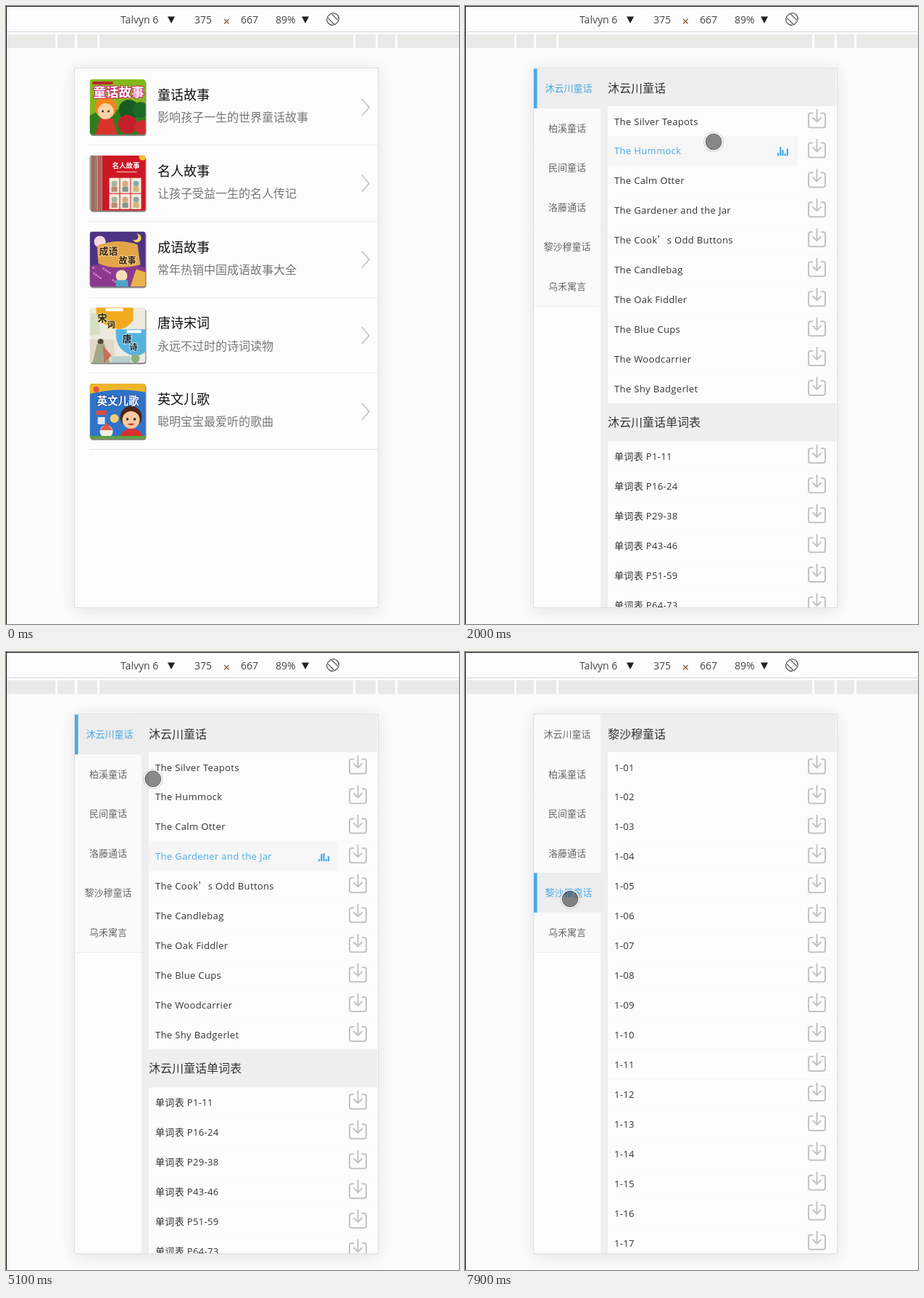
These frames come from a looping animation (625 by 851 pixels, 8 s). An HTML page:

```html
<!DOCTYPE html>
<html lang="zh">
<head>
<meta charset="utf-8">
<title>Story player</title>
<style>
html, body { margin: 0; width: 100%; height: 100%; overflow: hidden; background: #fbfbfb; }
svg { display: block; width: 625px; height: 851px; }
text { font-family: 'Open Sans', 'Noto Sans CJK SC', 'Noto Sans CJK', sans-serif; }
.wide { font-family: 'Noto Sans CJK SC', 'Noto Sans CJK', sans-serif; }
</style>
</head>
<body>
<svg viewBox="0 0 625 851">
  <defs>
    <filter id="blur" x="-20%" y="-20%" width="140%" height="140%"><feGaussianBlur stdDeviation="11"/></filter>
    <clipPath id="screen"><rect x="95" y="86" width="418" height="742"/></clipPath>
    <clipPath id="cover"><rect width="77" height="76" rx="4"/></clipPath>
    <g id="save" fill="none" stroke="#c3c3c3" stroke-width="2" stroke-linecap="round" stroke-linejoin="round">
      <path d="M-6-8.500h-2.500a3 3 0 0 0-3 3v14a3 3 0 0 0 3 3h17a3 3 0 0 0 3-3v-14a3 3 0 0 0-3-3h-2.500M0-13v16.500M-5.500-2L0 3.500l5.500-5.500"/>
    </g>
  </defs>
  <g id="frame"></g>
  <g id="page" clip-path="url(#screen)"></g>
  <g id="bars"></g>
  <g id="pointer">
    <circle r="13.300" fill="none" stroke="#777" stroke-opacity=".4"/>
    <circle r="12" fill="#000" fill-opacity=".45" stroke="#fff" stroke-width="1.600"/>
    <circle r="11" fill="none" stroke="#333" stroke-opacity=".35"/>
  </g>
</svg>
<script>
const LOOP = 8000, STEP = 100;
const BLUE = '#45aaea', TOP = 138, ROW = 40.95, HEAD = 52.3, TAB = 54.45;
const NONE = -1;
const $ = id => document.getElementById(id);

const rect = (x, y, w, h, fill, extra = '') =>
  `<rect x="${x}" y="${y}" width="${w}" height="${h}" fill="${fill}" ${extra}/>`;
const circle = (x, y, r, fill) => `<circle cx="${x}" cy="${y}" r="${r}" fill="${fill}"/>`;
const path = (d, fill, extra = '') => `<path d="${d}" fill="${fill}" ${extra}/>`;
const text = (x, mid, size, fill, str, extra = '') =>
  `<text x="${x}" y="${mid + size * 0.37}" font-size="${size}" fill="${fill}" ${extra}>${str}</text>`;
const repeat = (n, draw) => Array.from({ length: n }, (_, i) => draw(i)).join('');

// Cover art, drawn in a 77 x 76 box
const label = (x, y, size, fill, str, edge) =>
  text(x, y, size, fill, str, `font-weight="700" stroke="${edge}" stroke-width="2" paint-order="stroke"`);

const covers = [
  () => rect(0, 0, 77, 76, '#83b81c') + path('M0 50Q20 34 77 48V76H0z', '#2f7d1c') +
    circle(54, 42, 14, '#175b22') + circle(70, 42, 11, '#1d6a25') + circle(52, 62, 13, '#c51f2b') +
    circle(72, 66, 10, '#d02a30') + path('M8 76L14 54H32L38 76z', '#d9342b') +
    circle(22, 39, 15, '#f2851d') + circle(22, 44, 11, '#fbd3a4') + circle(18, 44, 1.5, '#333') +
    circle(26, 44, 1.5, '#333') + rect(4, 3, 28, 4, '#b8262c') + label(5, 18, 17.5, '#fff', '童话故事', '#d42a78'),
  () => rect(0, 0, 77, 76, '#cf1624') +
    repeat(6, i => rect(i * 3, 0, 2.4, 76, ['#8fae98', '#c96852', '#6f998e'][i % 3])) +
    label(31, 14, 9.5, '#fff', '名人故事', '#cf1624') + rect(37, 22, 28, 1.5, '#e9a69c') +
    repeat(6, i => rect(27 + i % 3 * 15, 31 + (i > 2) * 22, 14, 21, '#f1ead8') +
      circle(34 + i % 3 * 15, 39 + (i > 2) * 22, 4, ['#a5b6a0', '#d8a880', '#89a9ac'][i % 3]) +
      rect(30 + i % 3 * 15, 43 + (i > 2) * 22, 8, 7, ['#bf8b72', '#83998a', '#d4b57c'][i % 3])) +
    circle(73, 2, 5, '#f0c22f'),
  () => rect(0, 0, 77, 76, '#4d3384') + circle(14, 14, 8, '#f1d9ea') + circle(65, 9, 6, '#f6d353') +
    circle(62, 7, 5, '#4d3384') + path('M0 48Q32 38 77 50V76H0z', '#8a3a8d') +
    path('M10 20Q36 8 66 18L70 46Q34 54 12 44z', '#e3a548') + label(13, 27, 13, '#3b2114', '成语', '#f7d68e') +
    label(40, 40, 12, '#3b2114', '故事', '#f7d68e') + repeat(12, i => circle(5 + i * 23 % 36, 50 + i * 7 % 23, 1.5, '#d77bc0')) +
    circle(44, 61, 8, '#f7dcb9') + rect(36, 67, 17, 9, '#4fa2c9') + path('M56 76L64 52L77 56V76z', '#e9b44c'),
  () => rect(0, 0, 77, 76, '#eceadf') + rect(0, 8, 14, 30, '#d6dfc6') + rect(0, 44, 34, 32, '#e3d7c8') +
    path('M9 0H60V18Q47 34 34 28Q14 24 9 7z', '#f1a91e') + rect(22, 1, 24, 4, '#fff') +
    label(11, 14, 13, '#222', '宋', '#f8cf6d') + label(24, 24, 11, '#222', '词', '#f8cf6d') +
    path('M36 30H77V61Q62 72 47 60Q36 52 36 34z', '#56b3df') + label(45, 43, 13, '#222', '唐', '#a9ddf2') +
    label(55, 55, 11, '#222', '诗', '#a9ddf2') + rect(51, 31, 20, 4, '#fff') +
    circle(15, 47, 4, '#54473c') + path('M10 50H20L28 76H4z', '#a4a989') + path('M18 52L30 66L20 76z', '#c8705a') +
    circle(63, 70, 6, '#8db17e') + rect(30, 67, 26, 9, '#b8d0d0'),
  () => rect(0, 0, 77, 76, '#2f74c8') + path('M0 0H77V12Q40 4 0 14z', '#f0b52c') + circle(9, 8, 4, '#e5533a') +
    label(10, 24, 14.5, '#fff', '英文儿歌', '#2857a8') + rect(9, 37, 14, 6, '#e04a3b') + rect(11, 46, 10, 10, '#d6e4f2') +
    circle(57, 46, 15, '#4b2418') + circle(57, 50, 12, '#f8c8a0') + circle(52, 49, 1.7, '#222') + circle(62, 49, 1.7, '#222') +
    path('M52 55Q57 60 62 55z', '#c4302b') + path('M40 76Q46 61 57 62Q70 61 75 76z', '#d8302f') +
    circle(34, 48, 6, '#f0cf73') + circle(23, 66, 9, '#f3efe4') + path('M14 64L23 54L32 64z', '#e25a45') + rect(0, 72, 77, 4, '#5aa33e')
];

const shelf = [
  ['童话故事', '影响孩子一生的世界童话故事'],
  ['名人故事', '让孩子受益一生的名人传记'],
  ['成语故事', '常年热销中国成语故事大全'],
  ['唐诗宋词', '永远不过时的诗词读物'],
  ['英文儿歌', '聪明宝宝最爱听的歌曲']
];
const tabs = ['沐云川童话', '柏溪童话', '民间童话', '洛藤通话', '黎沙穆童话', '乌禾寓言'];
const lists = [
  { title: tabs[0], words: '1-11 16-24 29-38 43-46 51-59 64-73', items: [
    'The Silver Teapots', 'The Hummock', 'The Calm Otter', 'The Gardener and the Jar', 'The Cook’s Odd Buttons',
    'The Candlebag', 'The Oak Fiddler', 'The Blue Cups', 'The Woodcarrier', 'The Shy Badgerlet'] },
  { title: tabs[1], words: '1-9 14-22 27-36 41-48', items: [
    'The Miller at the Gate', 'The Copper Spoon', 'The Weaver and the Seven Hedgehogs', 'The Quiet Goose', 'The Clock and the Pear',
    'The Glass Wheel', 'The Old Ferry', 'The Paper Boots', 'The Lamp and the Owl', 'The Tailor and the Moth',
    'The Brass Feather', 'The Lost Mitten'] },
  { title: '经典民间童话', words: '1-7 12-22 27-34 39-49', items: [
    'The Tall Baker of Orrivel', 'How Did the Fog Hide', 'Cloud Stew', 'Nell and the Turnstile', 'Little Green Bonno',
    'The Marzipan Button', 'The Towering Radish', 'The Seven Spoons', 'The Seven Little Owls', 'A Heron Song',
    'The Duke and the Hens', 'The Seven Foxes'] },
  { title: tabs[3], words: '1-8 13-21 26-33 38-45 50-58 63-70 75-82', items: [
    'The Velvet Ladder', 'The Baron in the Reeds', 'The Mossy Crown', 'The Pearl Thistle', 'The Twin Millstones',
    'The Sleepy Lark', 'The Ivory Bucket', 'The Painted Gate'] },
  { title: tabs[4], words: '', items: Array.from({ length: 18 }, (_, i) => '1-' + String(i + 1).padStart(2, '0')) }
];

function drawFrame() {
  const gaps = [68, 95, 126, 479, 510, 537];
  const arrow = x => path(`M${x} 14.500h10l-5 9.500z`, '#222');
  $('frame').innerHTML = rect(0, 0, 625, 851, '#fbfbfb') + rect(0, 0, 625, 35, '#fdfdfd') +
    rect(0, 35, 625, 1, '#d2d5d8') + rect(0, 39, 625, 19, '#e9eae6') + gaps.map(x => rect(x, 39, 3, 19, '#fdfdfd')).join('') +
    rect(0, 0, 625, 1, '#111') + rect(0, 0, 1, 851, '#111') +
    text(158, 18.5, 14, '#444', 'Talvyn 6') + arrow(223) + text(260, 18.5, 14, '#444', '375') +
    path('M301 18l6.500 6.500m0-6.500l-6.500 6.500', 'none', 'stroke="#8a5a30" stroke-width="1.300"') +
    text(324, 18.5, 14, '#444', '667') + text(372, 18.5, 14, '#444', '89%') + arrow(408) +
    `<g transform="translate(451 18)" fill="none" stroke="#555" stroke-width="1.200">
      <rect x="-3.800" y="-7.500" width="7.600" height="15" rx="1" transform="rotate(-45)"/>
      <path d="M-1-8.400A8.500 8.500 0 0 1 8.400 1M1 8.400A8.500 8.500 0 0 1-8.400-1"/></g>` +
    rect(95, 88, 418, 744, '#000', 'opacity=".1" filter="url(#blur)"') +
    rect(94.5, 85.5, 419, 743, '#fcfcfc', 'stroke="#dcdfe1"');
}

function drawShelf(pressed) {
  return (pressed ? rect(95, 86, 418, 105, '#ececec') : '') + shelf.map(([name, note], i) => {
    const y = 101 + i * 104.75;
    return rect(116.5, y + 2, 77, 76, '#8b8b8b', 'rx="4"') +
      `<g transform="translate(115.500 ${y})" clip-path="url(#cover)">${covers[i]()}</g>` +
      text(209, y + 21.5, 18, '#111', name) + text(209, y + 52.5, 16, '#777', note) +
      path(`M491 ${y + 27}l10 11.500l-10 11.500`, 'none', 'stroke="#bdbdbd" stroke-width="1.400"') +
      rect(115, Math.round(y + 90), 398, 1, i < 4 ? '#ebebe8' : '#ecdfdf');
  }).join('');
}

function drawTab(name, i, active) {
  const y = 86.5 + i * TAB, on = i === active;
  return rect(95, y, 92, TAB, on ? '#ededed' : '#fafafa') + rect(95, Math.round(y + TAB), 92, 1, '#efefef') +
    (on ? rect(95, y, 4.5, TAB + 0.5, BLUE) : '') +
    text(on ? 143 : 141, y + 27, 13, on ? BLUE : '#666', name, 'text-anchor="middle"');
}

function drawList({ tab, playing, icons }) {
  const { title, items, words } = lists[tab];
  let y = TOP;
  const row = (name, on) => {
    const str = name.replace('’', '<tspan class="wide">’</tspan>');
    const out = rect(197, y, 315, ROW, '#fcfcfc') + (on ? rect(197, y, 262, ROW, '#f6f6f6') : '') +
      rect(197, Math.round(y + ROW), 315, 1, '#f2f2f2') +
      text(206, y + 20.7, 13, on ? BLUE : '#333', str, 'letter-spacing=".35"') +
      (icons ? `<use href="#save" x="485.500" y="${y + 18}"/>` : '');
    y += ROW;
    return out;
  };
  const head = name => {
    const out = rect(187, y, 325, HEAD, '#eee') + text(197, y + 26, 16, '#333', name);
    y += HEAD;
    return out;
  };
  let body = rect(187, 86, 325, 742, '#eee') + text(197, 113, 16, '#333', title) +
    items.map((name, i) => row(name, i === playing)).join('');
  if (words) body += head(title + '单词表') + words.split(' ').map(w => row('单词表 P' + w, false)).join('');
  return tabs.map((name, i) => drawTab(name, i, tab)).join('') + body;
}

function drawBars(t, playing) {
  if (playing === NONE) return '';
  const base = TOP + playing * ROW + 27.3;
  return repeat(5, i => {
    const h = Math.round(7.5 + 4.5 * Math.sin(t / 170 + i * 1.9));
    return rect(431 + i * 3.2, base - h, 2.2, h, BLUE);
  });
}

// Pointer route: time, x, y
const route = [
  [0, 660, 177], [200, 634, 177], [300, 660, 170], [500, 660, 144], [600, 612, 146], [800, 448, 195], [900, 380, 196],
  [1000, 341, 187], [1400, 343, 187], [2000, 343, 187], [2100, 340, 232], [2200, 328, 292], [2300, 283, 390],
  [2800, 283, 405], [3000, 285, 470], [3300, 285, 455], [3600, 290, 405], [4000, 300, 400], [4200, 312, 345],
  [4300, 312, 321], [4400, 306, 292], [4700, 306, 290], [5200, 177, 146], [5400, 172, 146], [5900, 131, 176],
  [6200, 131, 176], [6600, 140, 227], [6800, 141, 229], [7100, 145, 285], [7400, 145, 285], [7700, 145, 340], [8000, 145, 340]
];

function pointerAt(t) {
  const i = route.findIndex(p => p[0] > t);
  const [a, b] = [route[i - 1], route[i]], k = (t - a[0]) / (b[0] - a[0]);
  return [a[1] + (b[1] - a[1]) * k, a[2] + (b[2] - a[2]) * k];
}

// Value of the last entry already reached
const latest = (t, marks) => marks.reduce((v, [at, next]) => t >= at ? next : v, NONE);
const stateAt = t => ({
  open: t >= 1300,
  pressed: t >= 1200,
  icons: t >= 1600,
  tab: latest(t, [[0, 0], [6100, 1], [6800, 2], [7400, 3], [7900, 4]]),
  playing: latest(t, [[1900, 1], [3100, 7], [3700, 6], [4600, 3], [6100, NONE]])
});

let shown = '';
function render(t) {
  const state = stateAt(t), key = JSON.stringify(state);
  if (key !== shown) {
    shown = key;
    $('page').innerHTML = state.open ? drawList(state) : drawShelf(state.pressed);
  }
  $('bars').innerHTML = drawBars(t, state.playing);
  const [x, y] = pointerAt(t);
  $('pointer').setAttribute('transform', `translate(${x} ${y})`);
}

function tick() {
  render(Math.floor(performance.now() % LOOP / STEP) * STEP);
  requestAnimationFrame(tick);
}
drawFrame();
tick();
</script>
</body>
</html>
```
